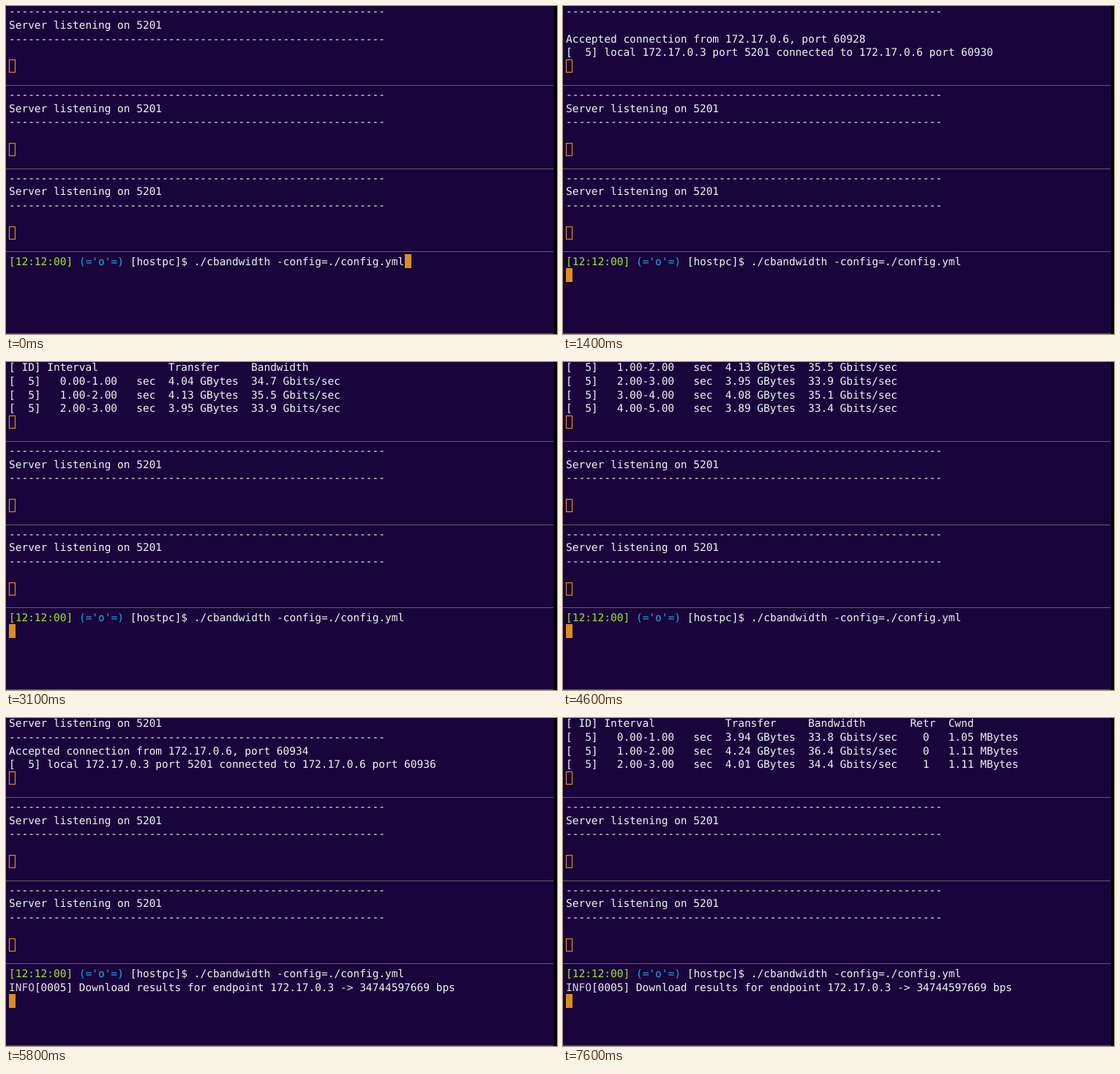
These frames come from a looping animation (753 by 448 pixels, 8000 ms). An HTML page with a canvas:

```html
<!DOCTYPE html>
<html lang="en">
<head>
<meta charset="utf-8">
<title>Bandwidth test</title>
<style>
  html, body { margin: 0; width: 100%; height: 100%; overflow: hidden; background: #19053b; }
  canvas { display: block; }
</style>
</head>
<body>
<canvas id="stage" width="753" height="448"></canvas>
<script>
const ctx = document.getElementById('stage').getContext('2d');
const LOOP = 8000;
const LEFT = 4, CELL = 8.72, ROW = 18.65, PANE = 113.75, BASELINE = 12.3;
const PROMPT_Y = 341.6;
const C = {
  bg: '#19053b', text: '#f3f1f5', rule: '#625c60', edge: '#000000',
  green: '#a5e135', cyan: '#25a5e2', cursor: '#dc8c20'
};

const DASHES = '-'.repeat(59);
const LISTENING = 'Server listening on 5201';
const accepted = port => `Accepted connection from 172.17.0.6, port ${port}`;
const local = port => `[  5] local 172.17.0.3 port 5201 connected to 172.17.0.6 port ${port}`;
const HEADER = '[ ID] Interval           Transfer     Bandwidth';

function sample(second, transfer, rate, tail = '') {
  const span = `${second}.00-${second + 1}.00`;
  return `[  5]   ${span}   sec  ${transfer} GBytes  ${rate} Gbits/sec${tail}`;
}
const upload = (second, transfer, rate, retr, cwnd) =>
  sample(second, transfer, rate, `    ${retr}   ${cwnd} MBytes`);

// Each entry appends lines to the top pane, which shows the last four.
const LOG = [
  [0, DASHES, LISTENING, DASHES, ''],
  [700, accepted(60928), local(60930)],
  [1500, HEADER, sample(0, '4.04', '34.7')],
  [2300, sample(1, '4.13', '35.5')],
  [3100, sample(2, '3.95', '33.9')],
  [3900, sample(3, '4.08', '35.1')],
  [4600, sample(4, '3.89', '33.4')],
  [4700, '[  5]   0.00-5.04   sec  20.3 GBytes  34.5 Gbits/sec' + ' '.repeat(18) + 'receiver',
    DASHES, LISTENING, DASHES],
  [5200, accepted(60934), local(60936)],
  [6000, HEADER + '       Retr  Cwnd', upload(0, '3.94', '33.8', 0, '1.05')],
  [6800, upload(1, '4.24', '36.4', 0, '1.11')],
  [7600, upload(2, '4.01', '34.4', 1, '1.11')]
];
const ENTER = 300, RESULT = 4900;

function write(text, col, y, color = C.text) {
  ctx.fillStyle = color;
  ctx.fillText(text, LEFT + col * CELL, y + BASELINE);
}

function fill(x, y, w, h, color) {
  ctx.fillStyle = color;
  ctx.fillRect(x, y, w, h);
}

function drawPane(index, lines) {
  const top = index * PANE;
  lines.forEach((line, i) => write(line, 0, top + i * ROW));
  ctx.strokeStyle = C.cursor;
  ctx.lineWidth = 1.2;
  ctx.strokeRect(4.5, Math.round(top + 73) + 0.5, 8, 17);
  fill(0, Math.round(top + 107.8), 748, 1, C.rule);
}

function drawPrompt(t) {
  write('[12:12:00]', 0, PROMPT_Y, C.green);
  write("(='o'=)", 11, PROMPT_Y, C.cyan);
  write('[hostpc]$ ./cbandwidth -config=./config.yml', 19, PROMPT_Y);
  if (t >= RESULT) {
    write('INFO', 0, PROMPT_Y + ROW, '#d9d5e3');
    write('[0005] Download results for endpoint 172.17.0.3 -> 34744597669 bps', 4, PROMPT_Y + ROW);
  }
  const row = t < ENTER ? 0 : t < RESULT ? 1 : 2;
  const x = row ? LEFT : LEFT + 62 * CELL;
  fill(Math.round(x), Math.round(339.3 + row * ROW), 9, 19, C.cursor);
}

function draw(t) {
  fill(0, 0, 753, 448, C.bg);
  ctx.font = `${CELL / 0.60205}px "DejaVu Sans Mono", monospace`;
  ctx.textRendering = 'geometricPrecision';
  const lines = LOG.filter(([at]) => at <= t).flatMap(([, ...added]) => added);
  drawPane(0, lines.slice(-4));
  const idle = [DASHES, LISTENING, DASHES];
  drawPane(1, idle);
  drawPane(2, idle);
  drawPrompt(t);
  fill(0, 447, 748, 1, C.rule);
  fill(749, 0, 4, 448, C.edge);
}

const start = performance.now();
function tick() {
  draw((performance.now() - start) % LOOP);
  requestAnimationFrame(tick);
}
tick();
</script>
</body>
</html>
```
